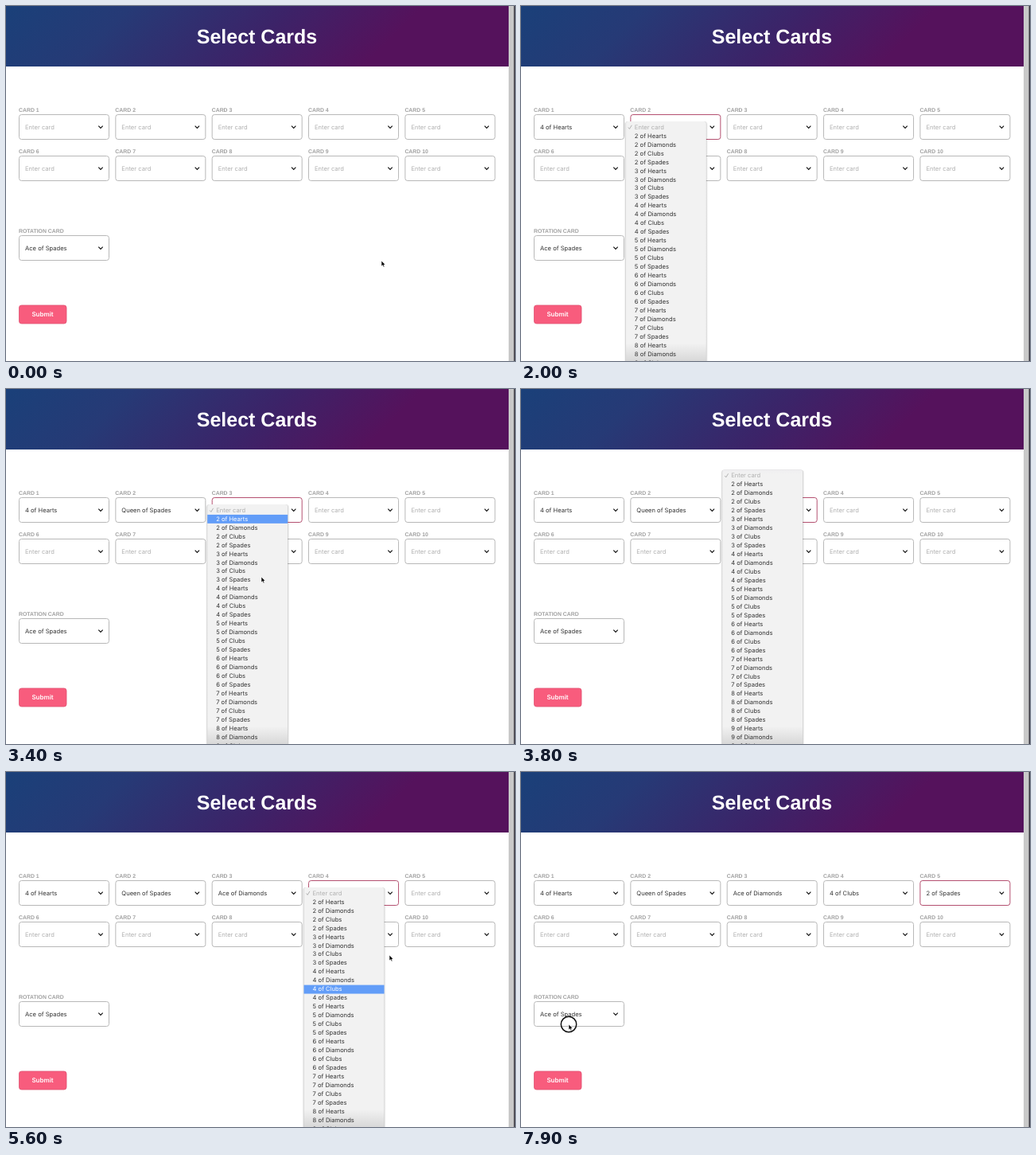
An HTML page that plays this animation: 640x446 px, repeating every 8 s.

```html
<!DOCTYPE html>
<html lang="en">
<head>
<meta charset="utf-8">
<title>Select Cards</title>
<style>
  html, body { margin: 0; width: 100%; height: 100%; overflow: hidden; background: #fff; }
  svg { display: block; width: 640px; height: 446px; }
  text { font: 7.6px Inter, "Open Sans", sans-serif; fill: #333; text-rendering: geometricPrecision; }
  .title { font: bold 25px "Liberation Sans", Arial, sans-serif; fill: #fff; }
  .label { font: bold 6.9px "Liberation Sans", Arial, sans-serif; fill: #a0a0a0; }
  .button { font-weight: 600; font-size: 8px; fill: #fff; }
  .hint { fill: #b0b0b0; }
</style>
</head>
<body>
<svg id="stage" viewBox="0 0 640 446">
  <defs>
    <linearGradient id="header" gradientUnits="userSpaceOnUse" x1="130" y1="-130" x2="490" y2="230">
      <stop offset="0" stop-color="#1a4079"/>
      <stop offset=".22" stop-color="#263a76"/>
      <stop offset=".5" stop-color="#3c2368"/>
      <stop offset=".73" stop-color="#55125c"/>
      <stop offset="1" stop-color="#55125c"/>
    </linearGradient>
    <linearGradient id="glass" gradientUnits="userSpaceOnUse" x1="0" y1="0" x2="0" y2="446">
      <stop offset="0" stop-color="#d2c8da"/>
      <stop offset=".13" stop-color="#d8d0df"/>
      <stop offset=".24" stop-color="#f2f2f2"/>
      <stop offset=".95" stop-color="#f2f2f2"/>
      <stop offset="1" stop-color="#d8d8d8"/>
    </linearGradient>
  </defs>
</svg>
<script>
const LOOP = 8000, STEP = 100;
const ROW = 10.97, FIRST_ROW = 152, MENU_WIDTH = 101;
const stage = document.getElementById('stage');

function add(parent, tag, attrs = {}, text) {
  const el = document.createElementNS('http://www.w3.org/2000/svg', tag);
  for (const key in attrs) el.setAttribute(key, attrs[key]);
  if (text !== undefined) el.textContent = text;
  parent.appendChild(el);
  return el;
}
const show = (el, on) => el.setAttribute('visibility', on ? 'visible' : 'hidden');
const columnX = i => 16.5 + 121.35 * i;

const ranks = [2, 3, 4, 5, 6, 7, 8, 9, 10, 'Jack', 'Queen', 'King', 'Ace'];
const suits = ['Hearts', 'Diamonds', 'Clubs', 'Spades'];
const options = ['Enter card', ...ranks.flatMap(r => suits.map(s => `${r} of ${s}`))];

// One entry per menu, in column order; scroll is the time the list starts moving up.
const picks = [
  { open: 700, close: 1300, row: 9 },
  { open: 2000, close: 2700, row: 44, scroll: 2100 },
  { open: 3300, close: 4500, row: 50, scroll: 3700 },
  { open: 5300, close: 5600, row: 11 },
  { open: 6300, close: 6900, row: 4 }
];

// time, x, y
const path = [
  [0, 472, 320], [600, 82, 156], [800, 82, 156], [1200, 62, 251], [1400, 62, 251],
  [1800, 180, 154], [1900, 180, 154], [2000, 180, 470], [2700, 190, 506], [2800, 190, 506],
  [3200, 300, 153], [3300, 300, 153], [3400, 321, 236], [3600, 318, 470], [4400, 318, 570],
  [4500, 370, 400], [4600, 417, 184], [4800, 430, 153], [5300, 430, 153], [5400, 425, 230],
  [5500, 425, 272], [5600, 482, 230], [5900, 545, 153], [6300, 545, 153], [6500, 540, 190],
  [6800, 536, 192], [7100, 536, 192], [7800, 60, 317], [8000, 60, 317]
];
const clicks = [700, 1300, 1900, 3300, 5300, 5500, 6300, 6900, 7900];

function pointerAt(t) {
  const i = Math.max(1, path.findIndex(p => p[0] >= t));
  const [t0, x0, y0] = path[i - 1], [t1, x1, y1] = path[i];
  const k = (t - t0) / (t1 - t0);
  return [x0 + (x1 - x0) * k, y0 + (y1 - y0) * k];
}

function addField(x, y, label, value) {
  add(stage, 'text', { x: x - .5, y: y - 4, class: 'label' }, label);
  const box = add(stage, 'rect', { x, y, width: 113, height: 31, rx: 3, fill: '#fff', stroke: '#b8b8b8' });
  const text = add(stage, 'text', { x: x + 7.5, y: y + 18.3 }, value);
  add(stage, 'path', {
    d: `M${x + 99.8} ${y + 14.2}l2.7 2.7l2.7-2.7`, fill: 'none', stroke: '#111', 'stroke-width': 1.2
  });
  return { box, text };
}

function addMenu(column) {
  const x = columnX(column) - 6;
  const root = add(stage, 'g');
  const height = options.length * ROW + 4;
  for (const [spread, alpha] of [[2, .04], [1, .06], [.5, .14]]) {
    add(root, 'rect', {
      x: x - spread, width: MENU_WIDTH + 2 * spread, height, rx: 3.5, fill: '#000', 'fill-opacity': alpha, class: 'panel'
    });
  }
  add(root, 'rect', { x, width: MENU_WIDTH, height, rx: 3, fill: 'url(#glass)', class: 'panel' });
  const list = add(root, 'g');
  const bar = add(list, 'rect', { x, width: MENU_WIDTH, height: ROW, fill: '#629df8' });
  add(list, 'path', {
    d: `M${x + 3} 152.5l1.6 1.9l2.8-4.6`, fill: 'none', stroke: '#aaa', 'stroke-width': .9
  });
  const rows = options.map((name, i) => add(list, 'text', {
    x: x + 11, y: FIRST_ROW + 2.7 + i * ROW, class: i ? '' : 'hint'
  }, name));
  return { x, root, list, bar, rows, panels: root.querySelectorAll('.panel') };
}

add(stage, 'rect', { width: 640, height: 446, fill: '#fff' });
add(stage, 'rect', { width: 632, height: 76, fill: 'url(#header)' });
add(stage, 'text', { x: 315.5, y: 47, class: 'title', 'text-anchor': 'middle' }, 'Select Cards');
add(stage, 'rect', { x: 632, width: 6.5, height: 446, fill: '#c9c9c9' });
add(stage, 'rect', { x: 638.5, width: 1.5, height: 446, fill: '#38363f' });

const fields = Array.from({ length: 10 }, (_, i) =>
  addField(columnX(i % 5), i < 5 ? 136.5 : 188.5, `CARD ${i + 1}`, options[0]));
fields.slice(5).forEach(f => f.text.setAttribute('class', 'hint'));
addField(columnX(0), 288.5, 'ROTATION CARD', 'Ace of Spades');

add(stage, 'rect', { x: 16.5, y: 376, width: 59.5, height: 23, rx: 3, fill: '#f85c7d', stroke: '#e05272', 'stroke-width': .8 });
add(stage, 'text', { x: 46, y: 390.4, class: 'button', 'text-anchor': 'middle' }, 'Submit');

const menus = picks.map((_, i) => addMenu(i));
const pointer = add(stage, 'g');
const ring = add(pointer, 'circle', { r: 9.7, fill: 'none', stroke: '#111', 'stroke-width': 1.5 });
add(pointer, 'path', {
  d: 'M0 0V7L1.6 5.6L2.7 8L3.9 7.5L2.9 5.1H5Z', fill: '#000', stroke: '#fff', 'stroke-width': .6
});

function hoveredRow(t, pick, menu, offset) {
  if (t >= pick.close) return pick.row;
  if (t <= pick.open) return 0;
  // The highlight trails the pointer by nearly one step.
  const [x, y] = pointerAt(t - 90);
  const row = Math.round((y - FIRST_ROW - offset) / ROW);
  return x > menu.x && x < menu.x + MENU_WIDTH && row < options.length ? Math.max(0, row) : 0;
}

function drawMenu(t, pick, menu) {
  const visible = t >= pick.open && t < pick.close + 200;
  show(menu.root, visible);
  show(menu.bar, false);
  if (!visible) return;
  const progress = pick.scroll ? Math.min(1, Math.max(0, (t - pick.scroll) / 300)) : 0;
  const offset = -130.5 * progress;
  menu.root.setAttribute('opacity', t > pick.close ? .55 : 1);
  menu.list.setAttribute('transform', `translate(0 ${offset})`);
  menu.panels.forEach(p => p.setAttribute('y', 145 + offset));
  const active = hoveredRow(t, pick, menu, offset);
  show(menu.bar, active > 0);
  menu.bar.setAttribute('y', FIRST_ROW + (active - .5) * ROW + .4);
  menu.rows.forEach((row, i) => row.style.fill = i && i === active ? '#fff' : '');
}

function render(time) {
  const t = Math.floor((time % LOOP) / STEP) * STEP;
  const focused = picks.filter(p => t >= p.open).length - 1;
  picks.forEach((pick, i) => {
    const { box, text } = fields[i];
    const chosen = t >= pick.close + 200;
    text.textContent = options[chosen ? pick.row : 0];
    text.setAttribute('class', chosen ? '' : 'hint');
    box.setAttribute('stroke', i === focused ? '#b45070' : '#b8b8b8');
    drawMenu(t, pick, menus[i]);
  });
  pointer.setAttribute('transform', `translate(${pointerAt(t)})`);
  show(ring, clicks.includes(t));
}

const start = performance.now();
function tick() {
  render(performance.now() - start);
  requestAnimationFrame(tick);
}
tick();
</script>
</body>
</html>
```
